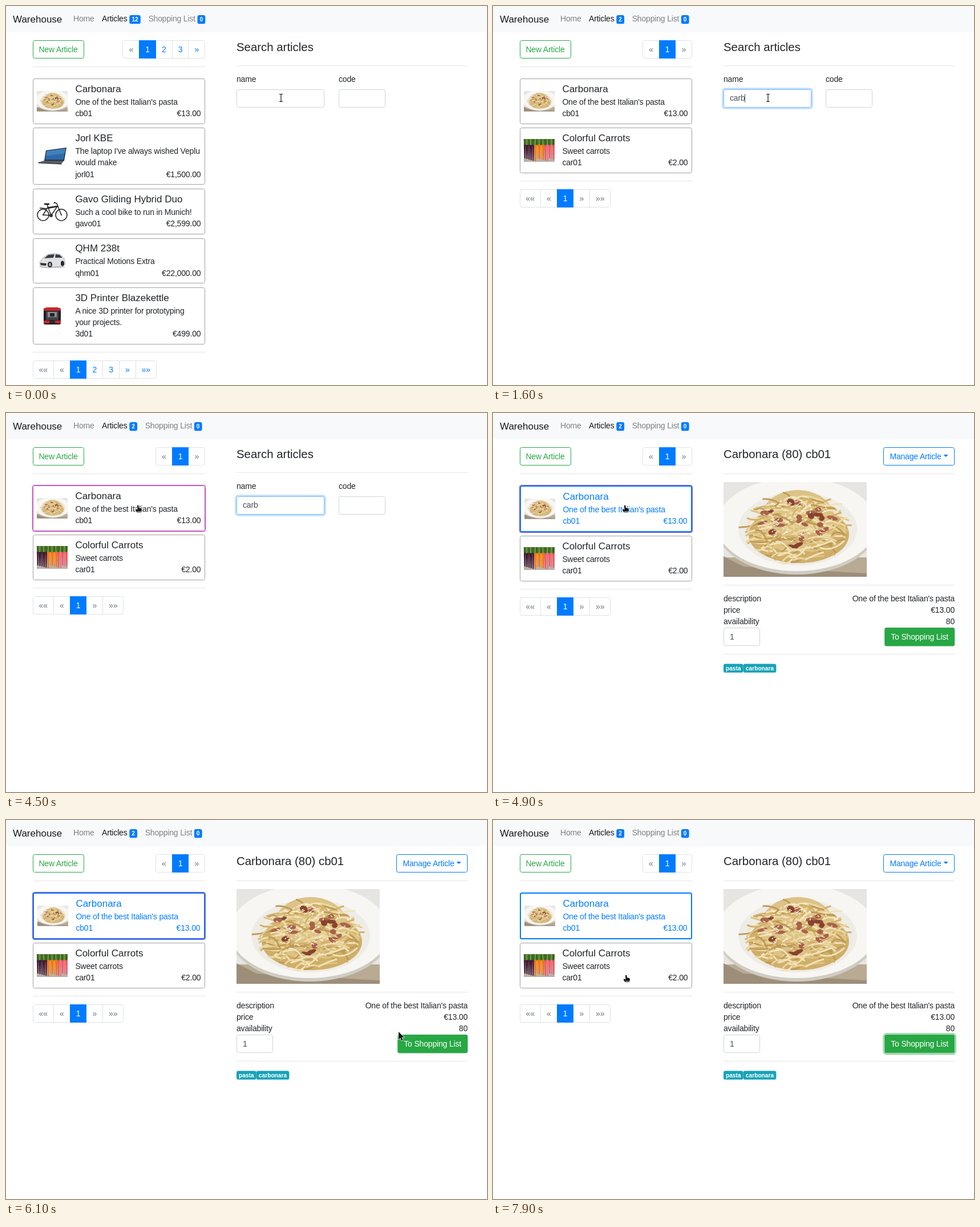
An HTML page for the animation above (8000 ms loop, 843x664 px).

```html
<!DOCTYPE html>
<html lang="en">
<head>
<meta charset="utf-8">
<title>Warehouse</title>
<style>
  html, body { margin: 0; width: 100%; height: 100%; overflow: hidden; background: #fff; }
  svg { display: block; width: 100vw; height: 100vh; }
  text { font-family: "Liberation Sans", Arial, sans-serif; white-space: pre; }
  .body { font-size: 14px; letter-spacing: -.0125em; }
  .serif { font-family: "Liberation Serif", Times, serif; font-size: 13.6px; }
</style>
</head>
<body>
<svg id="stage" viewBox="0 0 843 664">
  <defs id="art"></defs>
  <g id="page"></g>
  <g id="pointer"></g>
</svg>
<script>
const LOOP = 8000, STEP = 100;
const INK = '#212529', BLUE = '#007bff', GREEN = '#28a745', GREY = '#6c757d', LINE = '#dee2e6';
const LEFT = 47, RIGHT = 349;
const clamp = v => Math.max(0, Math.min(1, v));

// ---------- drawing helpers ----------
const rect = (x, y, w, h, fill, attrs = '') =>
  `<rect x="${x}" y="${y}" width="${w}" height="${h}" fill="${fill}" ${attrs}/>`;
const box = (x, y, w, h, stroke, fill = '#fff') =>
  rect(x + .5, y + .5, w - 1, h - 1, fill, `stroke="${stroke}" rx="3"`);
const path = (d, fill, attrs = '') => `<path d="${d}" fill="${fill}" ${attrs}/>`;
const ellipse = (x, y, rx, ry, fill, attrs = '') =>
  `<ellipse cx="${x}" cy="${y}" rx="${rx}" ry="${ry}" fill="${fill}" ${attrs}/>`;
const text = (x, y, s, { size, fill = INK, anchor = 'start', attrs = '' } = {}) =>
  `<text x="${x}" y="${y}" ${size ? `font-size="${size}"` : attrs || 'class="body"'} fill="${fill}" text-anchor="${anchor}" ${size ? attrs : ''}>${s}</text>`;
const rule = (x, y, w) => rect(x, y, w, 1, '#e5e5e5');
const badge = (x, y, w, s, fill = BLUE) => rect(x, y, w, 15.3, fill, 'rx="3.4"') +
  text(x + w / 2, Math.round(y + 11.3), s, { size: 10.2, fill: '#fff', anchor: 'middle', attrs: 'font-weight="700"' });
const ring = (x, y, w, h, color, opacity) =>
  rect(x - 1.4, y - 1.4, w + 2.8, h + 2.8, 'none', `rx="4.7" stroke="${color}" stroke-width="2.8" stroke-opacity="${opacity}"`);

// ---------- pictures ----------
function seeded(seed) {
  return () => (seed = (seed * 16807) % 2147483647) / 2147483647;
}

function pasta() {
  const rnd = seeded(77);
  const spot = spread => {
    const a = rnd() * 2 * Math.PI, r = Math.sqrt(rnd()) * spread;
    return [130 + 86 * r * Math.cos(a), 82 + 60 * r * Math.sin(a)];
  };
  let s = rect(0, 0, 251, 166, '#e6e5e1') + rect(0, 132, 251, 34, '#b9aa94') +
    path('M0 130L70 166H0ZM0 146L251 160V166H0Z', '#9d8e7a') +
    ellipse(128, 80, 140, 82, '#d0ccc3') + ellipse(128, 74, 140, 82, '#f7f6f3') +
    ellipse(130, 82, 104, 64, '#eeece6') + ellipse(132, 92, 88, 50, '#cfae6a') +
    ellipse(130, 68, 66, 54, '#dcc287');
  for (let i = 0; i < 190; i++) {
    const [x, y] = spot(.92), w = 18 + rnd() * 34, bend = rnd() * 30 - 20, tilt = rnd() * 20 - 10;
    const tone = ['#ecd9a2', '#dfc483', '#bf9a55', '#f2e4b9', '#d3b06a'][i % 5];
    s += path(`M${x - w / 2} ${y - tilt}q${w / 2} ${bend} ${w} ${2 * tilt}`, 'none', `stroke="${tone}" stroke-width="2.8"`);
  }
  for (let i = 0; i < 24; i++) {
    const [x, y] = spot(.74);
    s += ellipse(x, y - 13, 5 + rnd() * 6, 2.5 + rnd() * 3, i % 3 ? '#a8624a' : '#87432f',
      `transform="rotate(${rnd() * 70 - 35} ${x} ${y - 13})"`);
  }
  for (let i = 0; i < 90; i++) {
    const [x, y] = spot(.7);
    s += path(`M${x} ${y - 16}l${rnd() * 14 - 7} ${rnd() * 8 - 4}`, 'none', 'stroke="#f8f1dc" stroke-width="1.5"');
  }
  return s;
}

function carrots() {
  const tones = ['#4a1d3a', '#35152c', '#ff8c22', '#ef7414', '#ee5863', '#f5707a'];
  let s = rect(-27, -20, 54, 40, '#b9b0aa') + rect(-27, -20, 54, 13, '#48732b');
  for (let i = 0; i < 15; i++) {
    const x = -27 + i * 3.6, end = 14 + (i * 7) % 6;
    s += path(`M${x} -10h3.700L${x + 2.9} ${end}h-1.900Z`, tones[2 * (i / 5 | 0) + i % 2]) +
      path(`M${x + 1.5} -9l${i % 3 - 1} -11`, 'none', `stroke="${i % 2 ? '#7ea544' : '#315c21'}" stroke-width="1.500"`);
  }
  return s;
}

const laptop = () => path('M-11 -10L25 -15 21 8 -14 8Z', '#22272e') + path('M-10 -9L23.500 -13.500 20 6.500 -12.500 6.500Z', '#2d6aa8') +
  path('M-10 -9L23.500 -13.500 22 -5 -11 0Z', '#3f80bd') +
  path('M-14 8H21L16 13 -25 11Z', '#555b62') + path('M-25 11L16 13 17 14.500 -24 12.500Z', '#20242a');

const bike = () => [-16, 16].map(x => ellipse(x, 6, 10, 10, 'none', 'stroke="#222" stroke-width="1.500"') +
    ellipse(x, 6, 1.2, 1.2, '#333')).join('') +
  path('M-16 6L-8 -7 9 -9 -2 7 -16 6M-9 -12L-2 7M8 -14L16 6M8 -14L4 -16 3 -14M-22 -6L-9 -5', 'none', 'stroke="#222" stroke-width="1.500"') +
  path('M-8 -6L9 -9', 'none', 'stroke="#222" stroke-width="2.500"') +
  path('M-14 -13H-5', 'none', 'stroke="#111" stroke-width="2.500"') + ellipse(-2, 7, 3, 3, '#333');

const car = () => ellipse(0, 11, 23, 2, '#c9c9c9') +
  path('M-22 3L-17 -4 -8 -11Q4 -14 14 -11L21 -4 23 6 18 10 -13 12 -21 10Z', '#dfe1e3', 'stroke="#8d9195" stroke-width=".6"') +
  path('M-14 -4L-7 -10 4 -11 2 -5ZM5 -5L6 -11 13 -10 18 -5Z', '#363d44') +
  path('M-21 4L-10 5 -11 9 -20 8Z', '#30343a') + ellipse(-4, 7, 4, 5, '#25282c') + ellipse(-4, 7, 2, 3, '#a5a9ad') +
  ellipse(18, 5, 3, 4.5, '#25282c');

const printer = () => rect(-15, -14, 30, 29, '#1d1d20', 'rx="3"') + path('M-15 -9Q-14 -15 -9 -15H9Q14 -15 15 -9Z', '#c9252f') +
  rect(-11, -8, 22, 15, '#44464b') + rect(-8, -7, 16, 9, '#8b8f95') + rect(-4, -5, 8, 6, '#25262a') +
  rect(-15, 8, 30, 5, '#c9252f', 'rx="2"') + rect(-5, 8, 10, 5, '#2b2b2e');

document.getElementById('art').innerHTML =
  `<clipPath id="frame"><rect width="251" height="166"/></clipPath><g id="pasta" clip-path="url(#frame)">${pasta()}</g>`;

// ---------- data ----------
const article = (name, code, price, lines, thumb) => ({ name, code, price, lines, thumb });
const CARBONARA = article('Carbonara', 'cb01', '€13.00', ["One of the best Italian's pasta"],
  () => '<use href="#pasta" transform="translate(-27 -18) scale(.2155)"/>');
const CARROTS = article('Colorful Carrots', 'car01', '€2.00', ['Sweet carrots'], carrots);
const CATALOG = [
  CARBONARA,
  article('Jorl KBE', 'jorl01', '€1,500.00', ["The laptop I've always wished Veplu", 'would make'], laptop),
  article('Gavo Gliding Hybrid Duo', 'gavo01', '€2,599.00', ['Such a cool bike to run in Munich!'], bike),
  article('QHM 238t', 'qhm01', '€22,000.00', ['Practical Motions Extra'], car),
  article('3D Printer Blazekettle', '3d01', '€499.00', ['A nice 3D printer for prototyping', 'your projects.'], printer)
];
const SUGGESTIONS = ['fedora jorl kbe', 'jorl kbe', 'fedora jorl kbe', 'Gavo Gliding Hybrid Duo'];

// ---------- page parts ----------
function header(count) {
  const w = count > 9 ? 19.5 : 13.8, x = 229.9 + w;
  const faded = { fill: '#808081' };
  return rect(0, 0, 843, 46, '#f8f9fa') + text(12, 29, 'Warehouse', { size: 17, fill: '#19191a' }) +
    text(118, 27, 'Home', faded) + text(168, 27, 'Articles', { fill: '#19191a' }) + badge(216.3, 16, w, count) +
    text(x, 27, 'Shopping List', faded) + badge(x + 86.1, 16, 13.8, '0');
}

const pageWidth = label => label.length > 1 ? 36.25 : 28.75;
const pagesWidth = labels => labels.reduce((sum, label) => sum + pageWidth(label), .85);

function pagination(x, y, labels) {
  const single = !labels.includes('2'), start = Math.round(x), end = Math.round(x + pagesWidth(labels));
  let s = box(start, y, end - start, 32, LINE), active = '';
  labels.forEach((label, i) => {
    const w = pageWidth(label), left = Math.round(x);
    const disabled = label[0] === '«' || (single && label[0] === '»');
    if (i) s += rect(left, y, 1, 32, LINE);
    if (label === '1') active = rect(left, y, Math.round(x + w + .85) - left, 32, BLUE);
    const caption = text(x + w / 2 + .5, y + 21, label, { anchor: 'middle', fill: active && label === '1' ? '#fff' : disabled ? GREY : BLUE });
    if (label === '1') active += caption; else s += caption;
    x += w;
  });
  return s + active;
}

function card(item, top, selected, outlined) {
  const inset = selected ? 1 : 0;
  const height = 59.2 + 20.4 * item.lines.length + 2 * inset;
  const y = Math.round(top), h = Math.round(top + height) - y, w = RIGHT - LEFT;
  const fill = selected ? BLUE : INK, x = 121.4 + inset;
  const base = i => Math.floor(top + inset + 46.2 + 20.4 * i);
  const last = base(item.lines.length);
  let s = '';
  if (outlined) s += rect(LEFT - .5, y - .5, w + 1, h + 1, '#fff', 'rx="3" stroke="#d978cf"') +
    rect(LEFT - .5, y - .5, w + 1, h + 1, 'none', 'rx="3" stroke="#a62ca6" stroke-dasharray="1 1"');
  s += selected ? rect(LEFT + 1, y + 1, w - 2, h - 2, '#fff', `rx="2.6" stroke="${BLUE}" stroke-width="2"`)
    : box(LEFT, y, w, h, outlined ? '#c458c0' : '#a0a0a0');
  s += `<g transform="translate(${81 + inset} ${Math.round(top + height / 2)})">${item.thumb()}</g>`;
  s += text(x, Math.floor(top + inset + 24.2), item.name, { size: 17, fill });
  item.lines.forEach((line, i) => s += text(x, base(i), line, { fill }));
  s += text(x, last, item.code, { fill }) + text(341.4 - inset, last, item.price, { fill, anchor: 'end' });
  return { svg: s, height };
}

function listing(items, full, selected, outlined) {
  const numbers = full ? ['1', '2', '3'] : ['1'], short = ['«', ...numbers, '»'];
  let s = box(LEFT, 60, 90, 32, GREEN) + text(91.5, 81, 'New Article', { fill: GREEN, anchor: 'middle' }) +
    pagination(RIGHT - pagesWidth(short), 60, short) + rule(LEFT, 106, RIGHT - LEFT);
  let top = 127;
  items.forEach((item, i) => {
    const c = card(item, top, selected && i === 0, outlined && i === 0);
    s += c.svg;
    top += c.height + 6.8;
  });
  const y = Math.floor(top + 6.8);
  return s + rule(LEFT, y, RIGHT - LEFT) + pagination(46.6, y + 15, ['««', ...short, '»»']);
}

function search(typed, focus, caret, suggest) {
  let s = text(404, 79, 'Search articles', { size: 20.4 }) + rule(404, 104, 405) +
    text(404, 133, 'name') + text(583, 133, 'code') +
    box(583, 146, 82, 32, '#ced4da') + box(404, 146, 154, 32, focus ? '#80bdff' : '#ced4da');
  if (focus) s += ring(404, 146, 154, 32, BLUE, .25 * focus);
  s += text(415, 166, typed, { fill: '#495057' });
  if (caret) s += rect([415, 422, 429, 434, 441][typed.length], 154, 1, 15, '#495057');
  if (suggest) {
    s += rect(403, 180, 175, 136, '#000', 'opacity=".12" rx="3"') + rect(404, 179, 173, 135, '#141823', 'rx="2"');
    SUGGESTIONS.forEach((line, i) =>
      s += text(414.5, Math.round(204 + 30.5 * i), line, { fill: '#c9ccd2', attrs: 'class="serif"' }));
  }
  return s;
}

function detail(hover, focus) {
  let s = text(404, 79, 'Carbonara (80) cb01', { size: 20.4 }) +
    box(684, 60, 125, 32, BLUE) + text(695.4, 81, 'Manage Article', { fill: BLUE }) + path('M789.500 73h8.200l-4.100 4.100Z', BLUE) +
    rule(404, 106, 405) + '<use href="#pasta" x="404" y="121"/>' + rule(404, 301, 405);
  [['description', CARBONARA.lines[0]], ['price', CARBONARA.price], ['availability', '80']].forEach(([label, value], i) =>
    s += text(404, 330 + 20 * i, label) + text(809, 330 + 20 * i, value, { anchor: 'end' }));
  s += box(404, 376, 64, 32, '#ced4da') + text(415, 397, '1', { fill: '#495057' }) +
    rect(686.2, 376, 123, 32.4, hover ? '#218838' : GREEN, 'rx="3.4"');
  if (focus) s += ring(686.2, 376, 123, 32.4, GREEN, .5 * focus) +
    rect(685.5, 375.5, 124, 33, 'none', 'rx="3.4" stroke="#fff" stroke-dasharray="1 1"');
  return s + text(747.6, 397, 'To Shopping List', { fill: '#fff', anchor: 'middle' }) + rule(404, 422, 405) +
    badge(404, 439.5, 34.6, 'pasta', '#17a2b8') + badge(438.6, 439.5, 57.8, 'carbonara', '#17a2b8');
}

// ---------- pointer ----------
const OUTLINE = 'stroke="#fff" stroke-width="1.6" paint-order="stroke" stroke-linejoin="round"';
const BEAM = 'M-3 -6.500H-.8L0 -5.800 .8 -6.500H3M0 -6V6M-3 6.500H-.8L0 5.800 .8 6.500H3';
const POINTERS = {
  beam: path(BEAM, 'none', 'stroke="#fff" stroke-width="2.600"') + path(BEAM, 'none', 'stroke="#111" stroke-width="1.200"'),
  arrow: path('M0 0V13.500L3.100 10.700 5.300 15.500 7.600 14.500 5.400 9.800H9.700Z', '#111', OUTLINE),
  hand: path('M-2 -6Q-.8 -7 .3 -6L.8 -2 4.500 -1Q6 -.4 6 1.500L5 6H-2.500L-5.200 2Q-5.500 0 -3.500 .5L-1.500 1.500Z', '#111', OUTLINE) +
    path('M-2 4.500H5', 'none', 'stroke="#fff" stroke-width=".8"')
};
const TRACK = [
  [0, 482, 161, 'beam'], [2600, 482, 161, 'beam'], [2700, 503, 168, 'beam'], [2800, 544, 192, 'arrow'],
  [2900, 500, 210, 'arrow'], [3000, 420, 211, 'arrow'], [3100, 345, 203, 'hand'], [3200, 285, 194, 'hand'],
  [3300, 242, 186, 'hand'], [3400, 242, 186, 'hand'], [3700, 232, 168, 'hand'], [5300, 232, 168, 'hand'],
  [5400, 452, 185, 'arrow'], [6200, 722, 398, 'hand'], [6900, 722, 398, 'hand'], [7000, 480, 352, 'arrow'],
  [7100, 233, 307, 'arrow'], [7600, 233, 307, 'arrow'], [7800, 234, 288, 'hand'], [7900, 234, 278, 'hand'],
  [8000, 234, 278, 'hand']
];

function pointer(t) {
  const i = TRACK.findIndex(key => key[0] > t);
  const [t0, x0, y0, kind] = TRACK[i - 1], [t1, x1, y1] = TRACK[i];
  const k = (t - t0) / (t1 - t0);
  return `<g transform="translate(${Math.round(x0 + (x1 - x0) * k)} ${Math.round(y0 + (y1 - y0) * k)})">${POINTERS[kind]}</g>`;
}

// ---------- timeline ----------
const during = (t, ...spans) => spans.some(([from, to]) => t >= from && t < to);

function page(t) {
  const full = t < 1600, narrowed = during(t, [1700, 2400]);
  const items = full ? CATALOG : narrowed ? [CARBONARA] : [CARBONARA, CARROTS];
  const typed = 'carb'.slice(0, clamp((t - 1200) / 400) * 4);
  const caret = during(t, [400, 900], [1300, 2200], [2700, 3200], [3600, 4100]);
  let right = '';
  if (t < 4600) right = search(typed, clamp((t - 200) / 200), caret, during(t, [400, 1300]));
  else if (t >= 4900) right = detail(during(t, [6200, 7000]), clamp((t - 6200) / 200));
  return header(full ? 12 : items.length) + listing(items, full, t >= 4600, during(t, [4500, 6300])) + right;
}

const pageLayer = document.getElementById('page'), pointerLayer = document.getElementById('pointer');
let shown = -1;
function draw(now) {
  const t = Math.floor((now % LOOP) / STEP) * STEP;
  if (t !== shown) {
    shown = t;
    pageLayer.innerHTML = page(t);
    pointerLayer.innerHTML = pointer(t);
  }
  requestAnimationFrame(draw);
}
draw(performance.now());
</script>
</body>
</html>
```
